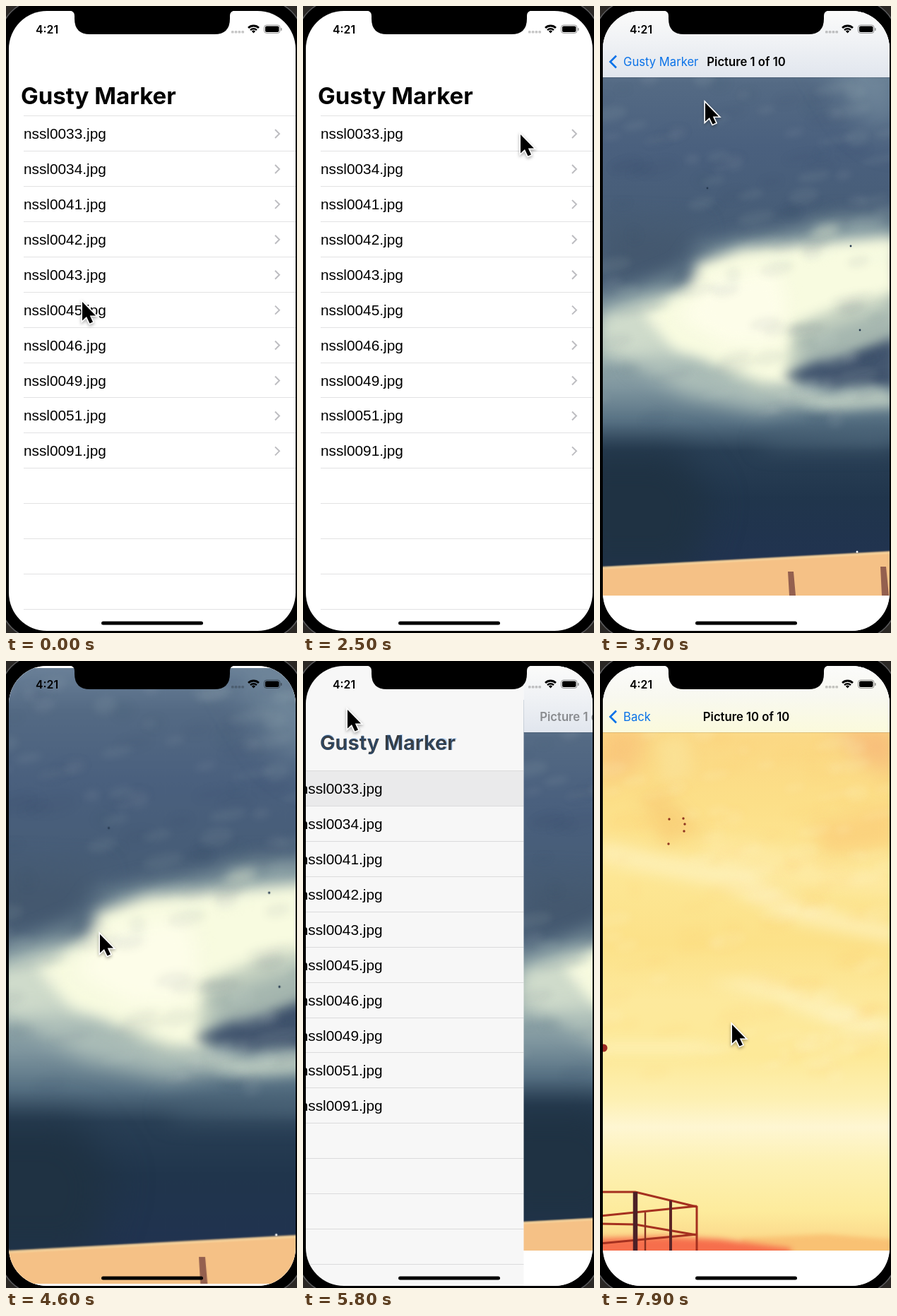
Recreate the animation shown at these times as an HTML page with a canvas. Size 412 by 888 pixels, loop 8 s.

```html
<!DOCTYPE html>
<html lang="en">
<head>
<meta charset="utf-8">
<style>
  html, body { margin: 0; width: 100%; height: 100%; overflow: hidden; background: #000; }
  canvas { display: block; width: 412px; height: 888px; }
</style>
</head>
<body>
<canvas id="stage" width="412" height="888"></canvas>
<script>
const ctx = document.getElementById('stage').getContext('2d');
const LOOP = 8000, STEP = 100;
const LEFT = 4, WIDTH = 406, ROW = 49.93;
const APP = 'Gusty Marker';
const FILES = ['33', '34', '41', '42', '43', '45', '46', '49', '51', '91'].map(n => `nssl00${n}.jpg`);
const BLUE = '#0a72e8';

const clamp = v => Math.max(0, Math.min(1, v));
const mix = (a, b, k) => a + (b - a) * k;
const ease = k => { k = clamp(k); return k * k * (3 - 2 * k); };
const spring = ms => { const x = Math.max(0, ms) * 0.0175; return 1 - (1 + x) * Math.exp(-x); };

// Pictures, painted once: a vertical gradient with soft shapes on top.
function paint(stops, shapes, mottle, lines) {
  const canvas = document.createElement('canvas');
  canvas.width = 412; canvas.height = 835;
  const c = canvas.getContext('2d');
  const sky = c.createLinearGradient(0, 0, 0, 835);
  stops.forEach(([y, colour]) => sky.addColorStop(y / 835, colour));
  c.fillStyle = sky;
  c.fillRect(0, 0, 412, 835);
  const fill = ([colour, blur, path]) => {
    c.filter = `blur(${blur}px)`;
    c.fillStyle = colour;
    c.fill(new Path2D(path));
  };
  shapes.forEach(fill);

  let seed = 7;
  const random = () => (seed = seed * 16807 % 2147483647) / 2147483647;
  c.filter = 'blur(5px)';
  for (let i = 0; i < 160; i++) {
    c.fillStyle = mottle[i % 2];
    c.beginPath();
    c.ellipse(random() * 412, 60 + random() * 540, 8 + random() * 22, 4 + random() * 8, -0.2, 0, 7);
    c.fill();
  }
  c.filter = 'none';
  lines(c, fill);
  return canvas;
}

function stroke(c, colour, width, path) {
  c.strokeStyle = colour;
  c.lineWidth = width;
  c.stroke(new Path2D(path));
}

function specks(c, colour, size, points) {
  c.fillStyle = colour;
  points.forEach(([x, y]) => { c.beginPath(); c.arc(x, y, size, 0, 7); c.fill(); });
}

const storm = paint(
  [[55, '#6a8098'], [110, '#546a84'], [200, '#4a607e'], [300, '#475d77'], [390, '#4f667e'],
   [440, '#8499a2'], [480, '#9fb2b0'], [540, '#7f969f'], [590, '#567083'], [630, '#293f55'],
   [700, '#20354c'], [790, '#213350']],
  [
    ['#72899c', 24, 'M310 50H420V190L370 150Z'],
    ['#44586f', 18, 'M0 310L140 315 130 350 100 385 0 395Z'],
    ['#8ca2a6', 14, 'M0 420L60 400 120 375 140 345 200 330 285 318 320 300 420 300V360H140L60 440 0 450Z'],
    ['#cfdbcb', 10, 'M0 438L70 415 130 395 160 470 200 530 120 525 60 505 0 490Z'],
    ['#a9bbb6', 14, 'M40 500L150 490 250 530 300 560 230 575 120 550Z'],
    ['#c9d5c3', 12, 'M180 380H420V450L300 490 270 540 220 540 150 500Z'],
    ['#f8fbe0', 9, 'M62 438L122 404 138 364 200 344 300 336 420 326V405L340 425 275 450 262 510 275 542 230 532 165 505 105 486Z'],
    ['#fdfde9', 12, 'M110 440L160 385 250 370 265 420 250 480 180 480Z'],
    ['#a5b6af', 13, 'M285 470L420 425V490L290 510Z'],
    ['#43566f', 8, 'M258 526L300 506 350 494 420 468V540L330 541Z'],
    ['#b5c5bc', 8, 'M230 536L330 550 390 540 420 552V568L330 574 270 562Z'],
    ['#bfcdc0', 7, 'M292 332L312 314 340 310 330 326Z'],
    ['#4b6478', 16, 'M230 610L420 590V622H230Z'],
    ['#1f3243', 24, 'M-40 630H110L160 700 130 800H-40Z']
  ],
  ['rgba(220,232,220,.07)', 'rgba(45,65,90,.055)'],
  (c, fill) => {
    fill(['#f5c186', 1, 'M-5 795L420 772V860H-5Z']);
    stroke(c, '#fbdfa8', 2, 'M0 796L412 774');
    fill(['#94604f', 0.6, 'M266 801H274L277 835H268Z M397 794H405L409 835H399Z']);
    c.filter = 'none';
    specks(c, '#25384e', 1.4, [[152, 258], [368, 459], [355, 340]]);
    specks(c, '#fff', 1.5, [[364, 773]]);
  });

const sunset = paint(
  [[55, '#fbe4a0'], [110, '#fbd884'], [200, '#fcdf88'], [300, '#fde795'], [400, '#fce188'],
   [480, '#fde99c'], [560, '#fde998'], [620, '#fdf0b2'], [660, '#fef6d2'], [710, '#fdf1b4'],
   [780, '#fdeb9c'], [835, '#fbd284']],
  [
    ['#f7bd7a', 16, 'M330 95H420V165L365 135Z'],
    ['#f9c87c', 14, 'M0 95H65L55 150 0 175Z'],
    ['#fae093', 10, 'M80 110L125 105 130 160 90 180Z'],
    ['#f9d27c', 10, 'M55 190L90 185 145 240 90 260Z'],
    ['#fbd27e', 12, 'M300 235L420 200V260L320 275Z'],
    ['#fde9a2', 12, 'M140 250L240 262 330 290 420 300V330L290 320 160 285Z'],
    ['rgba(254,243,192,.7)', 10, 'M0 255L90 275 200 290 290 345 420 375V400L280 370 170 320 0 285Z'],
    ['rgba(254,243,192,.8)', 10, 'M150 455L240 475 330 515 420 535V515L330 485 230 450Z'],
    ['rgba(254,244,192,.7)', 9, 'M0 540L140 540 200 550 120 556 0 556Z'],
    ['#f9c173', 3, 'M200 818L320 812 420 820V845H200Z'],
    ['#f66e4c', 4, 'M-9 818L90 815 170 819 270 832V845H-9Z']
  ],
  ['rgba(255,248,205,.13)', 'rgba(250,205,100,.08)'],
  c => {
    stroke(c, '#a5301f', 3, 'M0 752H50L137 773V835 M0 786L137 772 M0 797L50 798 137 813 M0 825L137 812');
    stroke(c, '#4d2026', 6.5, 'M50 752V835');
    stroke(c, '#5c2526', 4, 'M100 764V835');
    stroke(c, '#87301f', 2.4, 'M64 781V835');
    specks(c, '#8d3420', 1.7, [[98, 224], [118, 223], [120, 231], [119, 241], [97, 259]]);
    specks(c, '#9b2922', 5.5, [[5, 548]]);
  });

// Pointer stops: time, x, y of the tip.
const STOPS = [
  [0, 107, 417], [500, 110, 260], [900, 105, 170], [1300, 120, 380], [1800, 32, 596],
  [2100, 110, 331], [2200, 110, 331], [2500, 307, 180], [3000, 307, 180], [3600, 148, 135],
  [3800, 148, 135], [4100, 132, 385], [5150, 132, 385], [5500, 62, 67], [5900, 62, 67],
  [6600, 111, 608], [7100, 111, 608], [7600, 186, 513], [LOOP, 186, 513]
];

function pointerAt(t) {
  const i = STOPS.findIndex(s => s[0] > t);
  const [a, b] = [STOPS[i - 1], STOPS[i]];
  const k = ease((t - a[0]) / (b[0] - a[0]));
  return [mix(a[1], b[1], k), mix(a[2], b[2], k)];
}

function text(label, x, y, size, weight, colour, alpha = 1, align = 'left', family = 'Inter') {
  ctx.globalAlpha = clamp(alpha);
  ctx.font = `${weight} ${size}px ${family}, sans-serif`;
  ctx.fillStyle = colour;
  ctx.textAlign = align;
  ctx.fillText(label, x, y);
  ctx.globalAlpha = 1;
}

function rect(colour, x, y, w, h, r = 0) {
  ctx.fillStyle = colour;
  ctx.beginPath();
  ctx.roundRect(x, y, w, h, r);
  ctx.fill();
}

function drawList(p, selected, glow) {
  rect('#fff', 0, 0, 412, 888);
  ctx.save();
  ctx.translate(-0.3 * WIDTH * p, 0);
  if (selected >= 0) {
    ctx.globalAlpha = glow;
    rect('#cacacc', -200, 155 + ROW * selected, 812, 50);
    ctx.globalAlpha = 1;
  }
  for (let i = 0; i < 15; i++) rect('#e2e2e3', 25, Math.round(155 + i * ROW), 400, 1);
  FILES.forEach((name, i) => {
    const y = 181 + i * ROW;
    text(name, 25, y + 7, 20.8, 400, '#000', 1, 'left', '"Liberation Sans"');
    stroke(ctx, '#bdbdc1', 2, `M381 ${y - 6}l6 6l-6 6`);
  });
  ctx.restore();
  rect(`rgba(0,0,0,${0.13 * p})`, 0, 0, 412, 888);
}

function drawDetail(p, hidden, number) {
  const dx = WIDTH * (1 - p), first = number === 1;
  const top = mix(55, 9.5, hidden), scale = (mix(835, 882, hidden) - top) / 780;
  const barY = -96 * hidden;
  ctx.save();
  ctx.beginPath();
  ctx.rect(LEFT + dx, 0, 412, 888);
  ctx.clip();
  rect('#fff', 0, 0, 412, 888);
  ctx.drawImage(first ? storm : sunset, 0, 55, 412, 780,
    207 + dx - 207 * scale, top, 412 * scale, 780 * scale);
  const bar = ctx.createLinearGradient(0, 7 + barY, 0, 101 + barY);
  bar.addColorStop(0, '#fbfbfa');
  bar.addColorStop(0.45, first ? '#f0f2f5' : '#f8f8f0');
  bar.addColorStop(1, first ? '#e1e6ee' : '#fbfadc');
  rect(bar, 0, barY, 412, 101);
  rect('rgba(0,0,0,.15)', 0, 101 + barY, 412, 0.7);
  text(`Picture ${number} of 10`, 207 + 242 * (1 - p), 85 + barY, 16.7, 600, '#000', p * 1.7, 'center');
  ctx.restore();
}

// The large title shrinks into the back button as the detail slides in.
function drawTitle(p, hidden, label) {
  const grow = mix(1, 0.48, p), y = mix(127, 79, p) - 96 * hidden, x = mix(21, 33, p);
  const size = 33 * grow;
  text(APP, x, y + size * 0.365, size, 700, '#000', 1 - p);
  text(label, x, y + size * 0.365, size * 1.05, 400, BLUE, p);
  ctx.globalAlpha = clamp(p * 2 - 1);
  stroke(ctx, BLUE, 2.6, `M23 ${y - 8.5}l-8.5 8.5l8.5 8.5`);
  ctx.globalAlpha = 1;
}

function drawStatus() {
  text('4:21', 42, 38.5, 15.8, 600, '#000');
  for (let i = 0; i < 4; i++) rect('rgba(0,0,0,.22)', 319 + i * 4.8, 35, 3.6, 3.6, 1.2);
  [[10.5, 2.8], [6.3, 2.6], [1.9, 3.8]].forEach(([r, w]) => {
    ctx.beginPath();
    ctx.arc(350.5, 38.5, r, -Math.PI * 0.75, -Math.PI * 0.25);
    ctx.strokeStyle = '#000';
    ctx.lineWidth = w;
    ctx.stroke();
  });
  ctx.beginPath();
  ctx.roundRect(365.5, 27, 22.5, 11.5, 3.5);
  ctx.strokeStyle = 'rgba(0,0,0,.4)';
  ctx.lineWidth = 1;
  ctx.stroke();
  rect('#000', 367, 28.5, 19.5, 8.5, 2);
  rect('rgba(0,0,0,.4)', 389, 31, 1.6, 4, 1);
  rect('#000', 135, 871.5, 144, 5, 2.5);
}

function drawPointer(x, y) {
  const arrow = new Path2D('M1 2V28.5L7 23L11.5 32.5L16 30.5L11.8 21.5H20Z');
  ctx.save();
  ctx.translate(x, y);
  ctx.shadowColor = 'rgba(0,0,0,.35)';
  ctx.shadowBlur = 4;
  ctx.shadowOffsetY = 2;
  ctx.strokeStyle = '#fff';
  ctx.lineWidth = 3.2;
  ctx.stroke(arrow);
  ctx.shadowColor = 'transparent';
  ctx.fillStyle = '#000';
  ctx.fill(arrow);
  ctx.restore();
}

function draw(t) {
  const second = t >= 6500;
  const p = second ? spring(t - 6982) : clamp(spring(t - 2750) - spring(t - 5643));
  const hidden = ease((t - 4150) / 250) - ease((t - 5050) / 250);
  const selected = t >= 6850 ? 9 : t >= 2650 && !second ? 0 : -1;
  const glow = t > 5643 && !second ? p : 1;

  rect('#2b2825', 0, 0, 412, 888);
  rect('#5a5a5c', -10, -10, 432, 908, 59);
  rect('#000', -8.5, -8.5, 429, 905, 57.5);

  ctx.save();
  ctx.beginPath();
  ctx.roundRect(LEFT, 7, WIDTH, 878, 54);
  ctx.clip();
  drawList(p, selected, glow);
  if (p > 0.001) drawDetail(p, hidden, second ? 10 : 1);
  drawTitle(p, hidden, second ? 'Back' : APP);
  drawStatus();
  ctx.restore();

  ctx.fillStyle = '#000';
  ctx.fill(new Path2D('M90 6.5Q97 7 97 14V18Q97 40 119 40H295Q317 40 317 18V14Q317 7 324 6.5Z'));
  drawPointer(...pointerAt(t));
}

function tick() {
  draw(Math.floor(performance.now() % LOOP / STEP) * STEP);
  requestAnimationFrame(tick);
}
tick();
</script>
</body>
</html>
```
